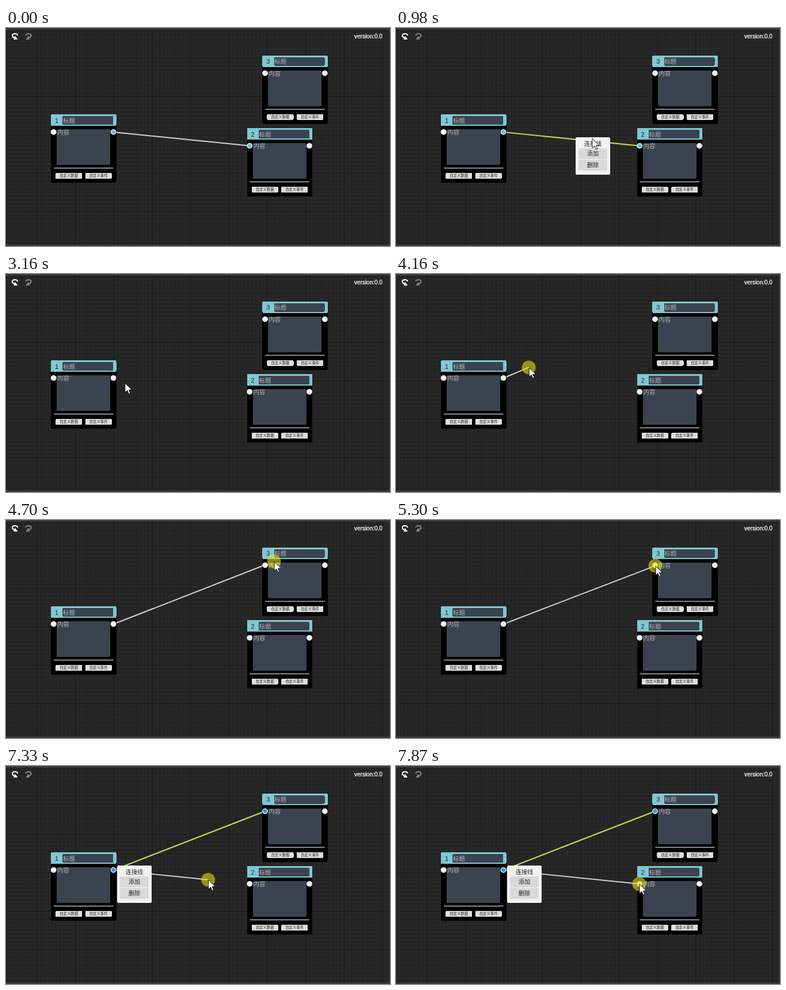
An HTML page for the animation above (8000 ms loop, 667 by 379 pixels).

```html
<!DOCTYPE html>
<html lang="zh">
<head>
<meta charset="utf-8">
<style>
html, body { margin: 0; width: 100%; height: 100%; overflow: hidden; background: #262626; }
svg { display: block; width: 667px; height: 379px; }
text { font: 10.5px "Liberation Sans", "Noto Sans CJK SC", "Noto Sans CJK", sans-serif; fill: #222; }
rect { shape-rendering: crispEdges; }
.version { font-size: 10px; fill: #fff; stroke: #fff; stroke-width: .25; }
.number { font-size: 11px; }
.hint { fill: #b4b4b4; }
.small { font-size: 6.4px; text-anchor: middle; }
.item { font-size: 10.2px; text-anchor: middle; }
.wire { stroke: #d6d6d6; stroke-width: 1.9; }
.wire.hot { stroke: #bfd252; stroke-width: 2.2; }
</style>
</head>
<body>
<svg viewBox="0 0 667 379">
  <defs>
    <pattern id="minor" x="53.5" y="52" width="6.667" height="6.667" patternUnits="userSpaceOnUse">
      <path d="M.5 0V6.667M0 .5H6.667" stroke="#212121"/>
    </pattern>
    <pattern id="major" x="53.5" y="52" width="66.667" height="66.667" patternUnits="userSpaceOnUse">
      <path d="M.5 0V66.667M0 .5H66.667" stroke="#1b1b1b" stroke-width="1.2"/>
    </pattern>
    <g id="undo">
      <path d="M20.3 13.2C19.6 8.9 11.2 8.8 11 13.2C10.9 15.2 12.4 16.2 14.5 17" fill="none" stroke="currentColor" stroke-width="2"/>
      <path d="M13.2 20H20.4L15.6 13.8Z" fill="currentColor"/>
    </g>
  </defs>
  <rect width="667" height="379" fill="#282828"/>
  <rect width="667" height="379" fill="url(#minor)"/>
  <rect width="667" height="379" fill="url(#major)"/>
  <path d="M0 1.5H667M0 377.5H667" stroke="#555"/>
  <path d="M666.5 2V377" stroke="#3c3c3c"/>
  <use href="#undo" color="#fff"/>
  <use href="#undo" color="#858585" transform="translate(54.5) scale(-1 1)"/>
  <text class="version" x="605" y="18">version:0.0</text>
  <g id="wires"></g>
  <g id="nodes"></g>
  <g id="menu"></g>
  <g id="pointer">
    <circle id="halo" cx="-.5" r="12" fill="#e8e414" fill-opacity=".58"/>
    <path d="M0 .5V16.5L3.8 13.1L6.5 19L9 17.9L6.4 12.1H11.8Z" fill="#fff" stroke="#000" stroke-width=".9"/>
  </g>
</svg>
<script>
const LOOP = 8000, STEP = 76.9;
const $ = id => document.getElementById(id);

const rect = (x, y, w, h, fill, r = 2) =>
  `<rect x="${x}" y="${y}" width="${w}" height="${h}" rx="${r}" fill="${fill}"/>`;
const text = (kind, x, y, str) => `<text class="${kind}" x="${x}" y="${y}">${str}</text>`;
const button = (x, y, w, h, fill, kind, base, str) =>
  rect(x, y, w, h, fill) + text(kind, x + w / 2, y + base, str);

const node = (n, x, y) => `<g transform="translate(${x} ${y})">
  ${rect(0, 0, 113.6, 119, '#000')}
  ${rect(0, 0, 113.6, 20, '#7fc8d2')}
  ${rect(20.3, 3, 88, 15, '#3c4350')}
  ${rect(10, 26, 93, 62, '#3c4350')}
  ${text('number', 7, 14.5, n)}
  ${text('hint', 21, 14.5, '标题')}
  ${text('hint', 11, 35.2, '内容')}
  <path d="M5 93.5H108.5" stroke="#fff"/>
  ${button(8, 102, 46.3, 10, '#dedede', 'small', 7.3, '自定义数据')}
  ${button(59.5, 102, 46.3, 10, '#dedede', 'small', 7.3, '自定义事件')}
  <circle id="in${n}" cx="4.7" cy="30.8"/>
  <circle id="out${n}" cx="108.5" cy="30.8"/>
</g>`;

$('nodes').innerHTML = node(1, 78, 150) + node(3, 445.3, 47.8) + node(2, 418.5, 174);
$('wires').innerHTML = ['wire2', 'wire3', 'drag']
  .map(id => `<line id="${id}" class="wire" x1="186.6" y1="181"/>`).join('');
$('menu').innerHTML = rect(0, 0, 60, 65, '#f3f3f3', 3) + text('item', 30, 15, '连接线') +
  ['添加', '删除'].map((s, i) => button(5, 19 + 20 * i, 50, 19, '#d9d9d9', 'item', 13.4, s)).join('');

// hand movements: start, end, and where the tip comes to rest
const entry = [529, 362];
const moves = [
  [140, 900, 341, 192], [1530, 1680, 338, 168], [1680, 1910, 335, 207],
  [2310, 2460, 354, 241], [2940, 3280, 183, 181], [4100, 4690, 466, 72],
  [4780, 5300, 451, 79.6], [5500, 5720, 482, 95], [5720, 6320, 188, 181],
  [6870, 7840, 423, 205]
];
const easeOut = u => 1 - (1 - u) ** 2;

function tipAt(t) {
  let [x, y] = entry;
  for (const [from, to, toX, toY] of moves) {
    const u = easeOut(Math.min(1, Math.max(0, (t - from) / (to - from))));
    x += (toX - x) * u;
    y += (toY - y) * u;
  }
  return [x, y];
}

const show = (id, on) => $(id).setAttribute('visibility', on ? 'inherit' : 'hidden');
const moveTo = (id, x, y) => $(id).setAttribute('transform', `translate(${x} ${y})`);

function wire(id, on, hot, x, y) {
  show(id, on);
  $(id).classList.toggle('hot', hot);
  $(id).setAttribute('x2', x);
  $(id).setAttribute('y2', y);
}

function port(id, color) {
  const el = $(id);
  el.setAttribute('fill', color || '#f2f2f2');
  el.setAttribute('stroke', color ? '#f2f2f2' : 'none');
  el.setAttribute('stroke-width', 1.4);
  el.setAttribute('r', color ? 4.2 : 4.9);
}

function draw(t) {
  const within = (a, b) => t >= a && t < b;
  const [x, y] = tipAt(Math.floor((t + 20) / STEP) * STEP);
  const linked2 = t < 2690, linked3 = t >= 5550, away = within(1610, 1830);
  const pale = linked2 && '#69bfe0', bright = linked3 && '#1c9cf0';

  wire('wire2', linked2, t >= 820 && !away, 423, 204.8);
  wire('wire3', linked3, t >= 6100, 450, 78.6);
  wire('drag', within(4160, 5550) || t >= 6940, false, x - .5, y);
  port('out1', pale || bright);
  port('in2', pale);
  port('in3', bright);
  ['in1', 'out2', 'out3'].forEach(id => port(id));

  show('menu', (within(980, 2690) && !away) || t >= 6170);
  moveTo('menu', ...(linked2 ? [312, 190] : [193, 173]));
  show('pointer', t >= 140);
  show('halo', within(2610, 2780) || within(3850, 5550) || t >= 6790);
  moveTo('pointer', x.toFixed(1), y.toFixed(1));
}

const start = performance.now();
function frame() {
  draw((performance.now() - start) % LOOP);
  requestAnimationFrame(frame);
}
frame();
</script>
</body>
</html>
```
